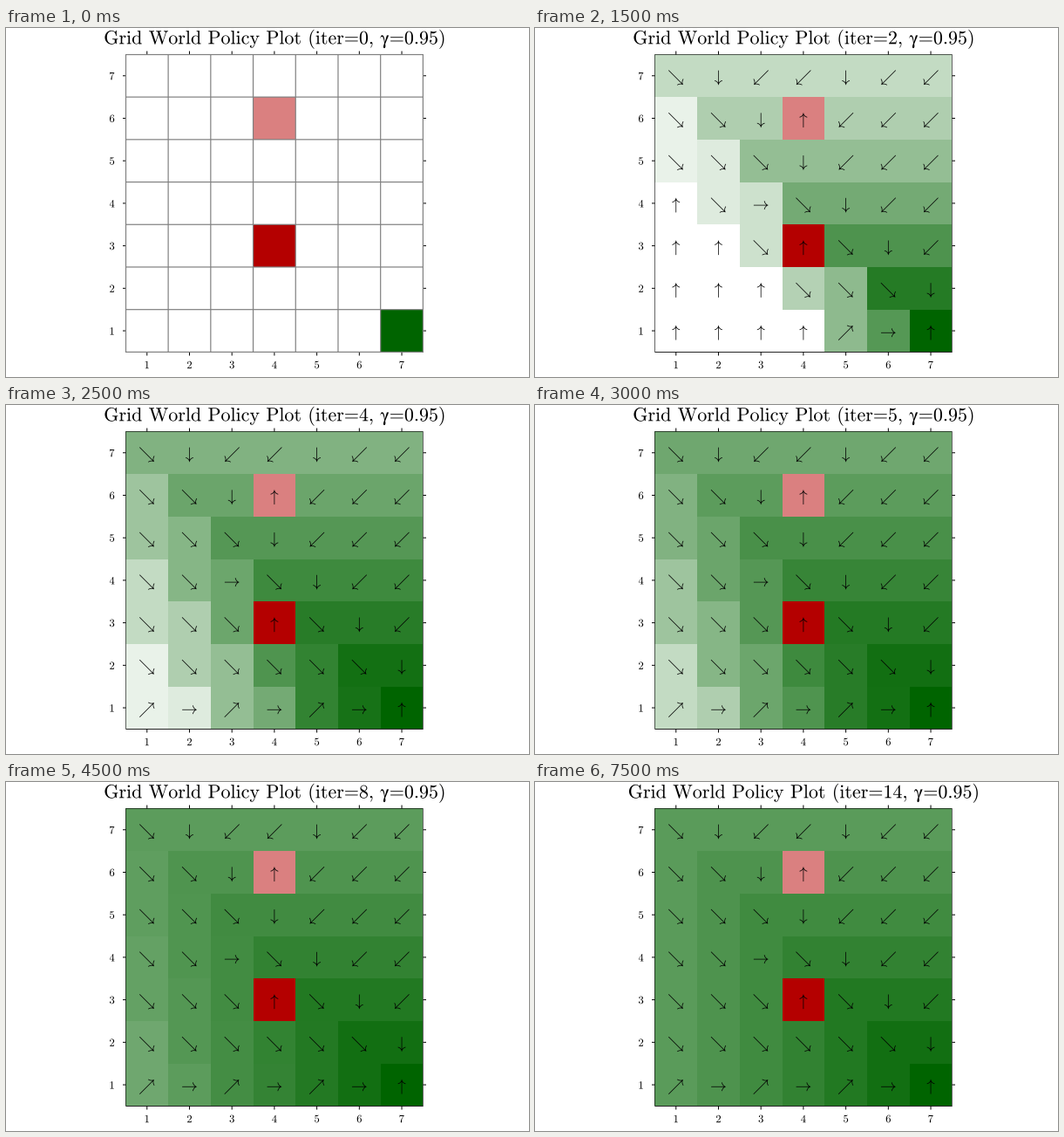
Recreate the animation shown at these times as a matplotlib script. Size 600 by 400 pixels, loop 8000 ms.

```python
import numpy as np
import matplotlib.pyplot as plt
from matplotlib.animation import FuncAnimation
from matplotlib.patches import PathPatch
from matplotlib.textpath import TextPath
from matplotlib.transforms import Affine2D

plt.rcParams["mathtext.fontset"] = "cm"

W, H, DPI = 600, 400, 100
PX = 72 / DPI
N = 7
LEFT, RIGHT, TOP, BOTTOM = 137.4, 478.4, 30.4, 371.4
CELL = (RIGHT - LEFT) / N

GAMMA, P_MOVE, ITERS = 0.95, 0.7, 14
REWARD = {(4, 3): -1.0, (4, 6): -0.5, (7, 1): 1.0}
# On ties the earlier action wins.
ACTIONS = {
    r"\uparrow": (0, 1), r"\swarrow": (-1, -1), r"\downarrow": (0, -1),
    r"\searrow": (1, -1), r"\rightarrow": (1, 0), r"\nearrow": (1, 1),
    r"\leftarrow": (-1, 0), r"\nwarrow": (-1, 1),
}
STATES = [(x, y) for y in range(1, N + 1) for x in range(1, N + 1)]
GREEN = np.array([0, 100, 0]) / 255
RED = np.array([180, 0, 0]) / 255


def sweep(u, policy):
    """One in-place pass of value iteration; a failed move stays put."""
    u, policy = dict(u), dict(policy)
    for s in STATES:
        if s in REWARD:
            u[s] = REWARD[s]
            continue
        q = {a: u.get((s[0] + dx, s[1] + dy), u[s])
             for a, (dx, dy) in ACTIONS.items()}
        best = max(q, key=lambda a: round(q[a], 9))
        policy[s] = best
        u[s] = GAMMA * (P_MOVE * q[best] + (1 - P_MOVE) * u[s])
    return u, policy


def solve():
    steps = [({s: 0.0 for s in STATES}, {s: r"\uparrow" for s in STATES})]
    for _ in range(ITERS):
        steps.append(sweep(*steps[-1]))
    return steps


def shade(v):
    return 1 + ((GREEN if v > 0 else RED) - 1) * abs(v)


def value_image(u):
    img = np.ones((N, N, 3))
    for x, y in STATES:
        img[N - y, x - 1] = shade(REWARD.get((x, y), u[x, y]))
    return img


def center(x, y):
    return LEFT + (x - 0.5) * CELL, BOTTOM - (y - 0.5) * CELL


def glyphs(tex, size, x, y, baseline=False):
    """Outline of a formula centred on x, and on y unless y is its baseline."""
    path = TextPath((0, 0), f"${tex}$", size=size)
    box = path.get_extents()
    dy = 0 if baseline else -(box.y0 + box.y1) / 2
    move = Affine2D().translate(-(box.x0 + box.x1) / 2, dy)
    return move.scale(1, -1).translate(x, y).transform_path(path)


def title_path(k):
    text = f"Grid World Policy Plot (iter={k}, γ=0.95)"
    # Separate letters keep the line free of kerning.
    tex = "".join(r"\hspace{0.38}" if c == " " else rf"\text{{{c}}}"
                  for c in text)
    return glyphs(tex, 22, (LEFT + RIGHT) / 2, 18.3, baseline=True)


fig = plt.figure(figsize=(W / DPI, H / DPI), dpi=DPI, facecolor="white")
ax = fig.add_axes([0, 0, 1, 1])
ax.axis("off")


def ink(path):
    return ax.add_patch(PathPatch(path, fc="black", lw=0, zorder=5))


def line(xs, ys, color="black", width=1.0, z=3):
    return ax.plot(xs, ys, color=color, lw=width * PX, zorder=z, snap=False,
                   solid_capstyle="butt")[0]


steps = solve()
images = [value_image(u) for u, _ in steps]
titles = [title_path(k) for k in range(ITERS + 1)]

# Cell edges fall on whole pixels
heat = ax.pcolormesh(np.round(np.linspace(LEFT, RIGHT, N + 1)),
                     np.round(np.linspace(TOP, BOTTOM, N + 1)),
                     images[0], antialiased=False, zorder=1)
ax.set_xlim(0, W)
ax.set_ylim(H, 0)
ax.set_autoscale_on(False)

# Frame, outward ticks and labels
x0, x1, y0, y1 = 137.5, 478.5, 30.5, 371.5
line([x0, x0, x1, x1], [y1, y0, y0, y1], width=0.6)
line([x0, x1], [y1, y1], width=0.85)
for n in range(1, N + 1):
    cx, cy = center(n, n)
    for a, b in ((y0 - 4, y0), (y1, y1 + 4)):
        line([cx, cx], [a, b])
    for a, b in ((x0 - 3.5, x0), (x1, x1 + 3.5)):
        line([a, b], [cy, cy])
    ink(glyphs(str(n), 12.6, cx, 386))
    ink(glyphs(str(n), 12.6, 121.6, cy + 0.3))

grid = []
for k in range(N + 1):
    gx = np.clip(LEFT + k * CELL, x0, x1)
    gy = np.clip(TOP + k * CELL, y0, y1)
    grid.append(line([gx, gx], [y0, y1], "gray", 1.2, 4))
    grid.append(line([x0, x1], [gy, gy], "gray", 1.2, 4))

title = ink(titles[0])
arrow_paths = {}
for s in STATES:
    cx, cy = center(*s)
    for a in {policy[s] for _, policy in steps}:
        arrow_paths[s, a] = glyphs(a, 18.9, cx, cy + 2.2)
arrows = {s: ink(arrow_paths[s, r"\uparrow"]) for s in STATES}


def update(i):
    k = max(i - 1, 0)
    policy = steps[k][1]
    heat.set_array(images[k])
    title.set_path(titles[k])
    for g in grid:
        g.set_visible(i == 0)
    for s, patch in arrows.items():
        patch.set_path(arrow_paths[s, policy[s]])
        patch.set_visible(i > 0)
    return [heat, title, *grid, *arrows.values()]


anim = FuncAnimation(fig, update, frames=ITERS + 2, interval=500,
                     repeat=True, repeat_delay=0)
plt.show()
```
